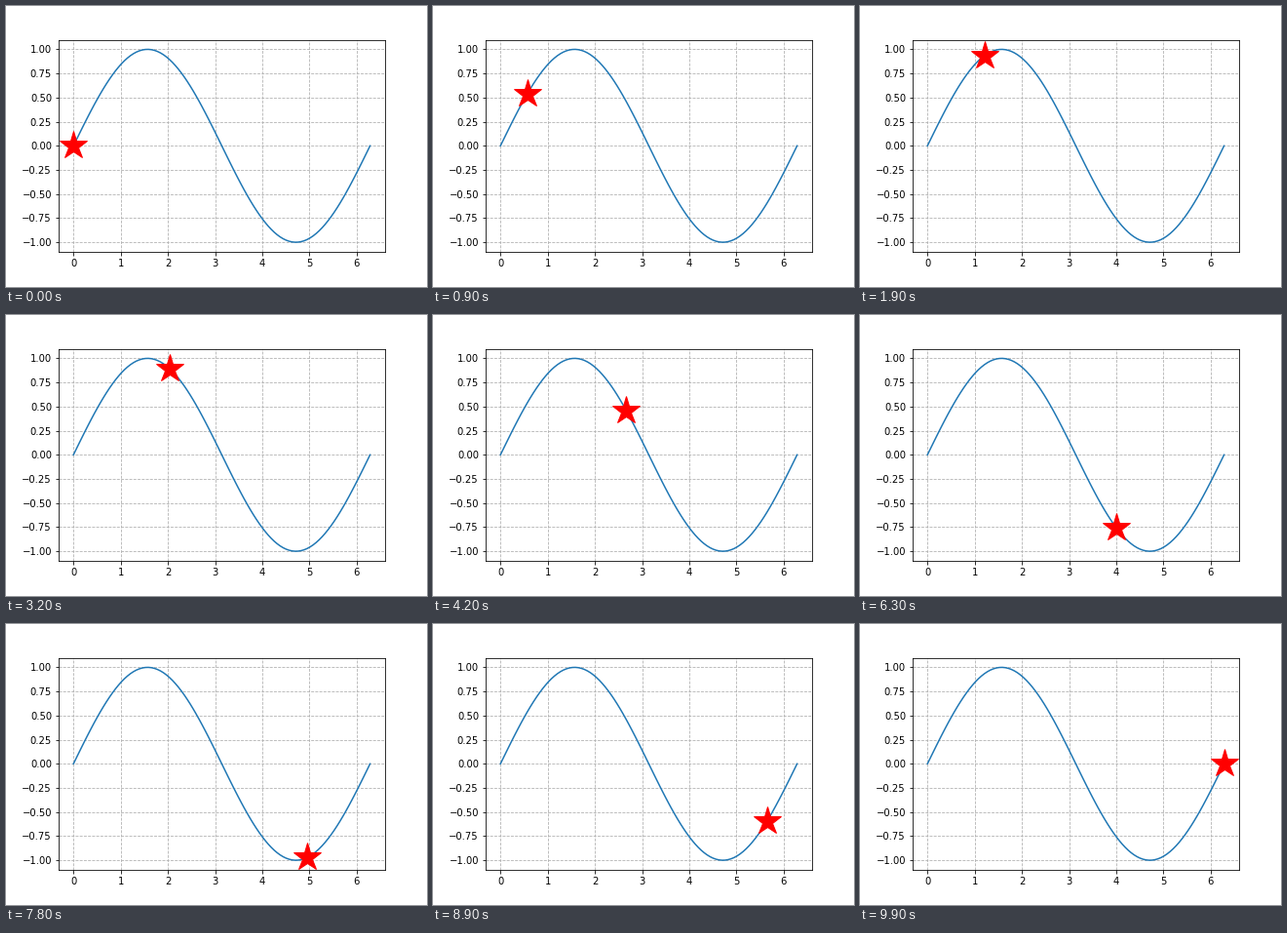
Write a matplotlib script that moves like this. It is 432 px wide and 288 px high and loops after 10 s.

```python
import numpy as np
import matplotlib.pyplot as plt
from matplotlib.animation import FuncAnimation

FRAMES = 100
INTERVAL = 100

x = np.linspace(0, 2 * np.pi, FRAMES)
y = np.sin(x)

plt.rcParams["font.family"] = "DejaVu Sans"
plt.rcParams["font.size"] = 10

fig, ax = plt.subplots(figsize=(6, 4), dpi=72)
fig.subplots_adjust(left=0.125, right=0.9, bottom=0.125, top=0.88)

ax.plot(x, y)
ax.grid(linestyle="--")
star, = ax.plot(x[:1], y[:1], "r*", markersize=30)


def update(i):
    star.set_data([x[i]], [y[i]])
    return star,


anim = FuncAnimation(fig, update, frames=FRAMES, interval=INTERVAL,
                     repeat=True, repeat_delay=0)
plt.show()
```
